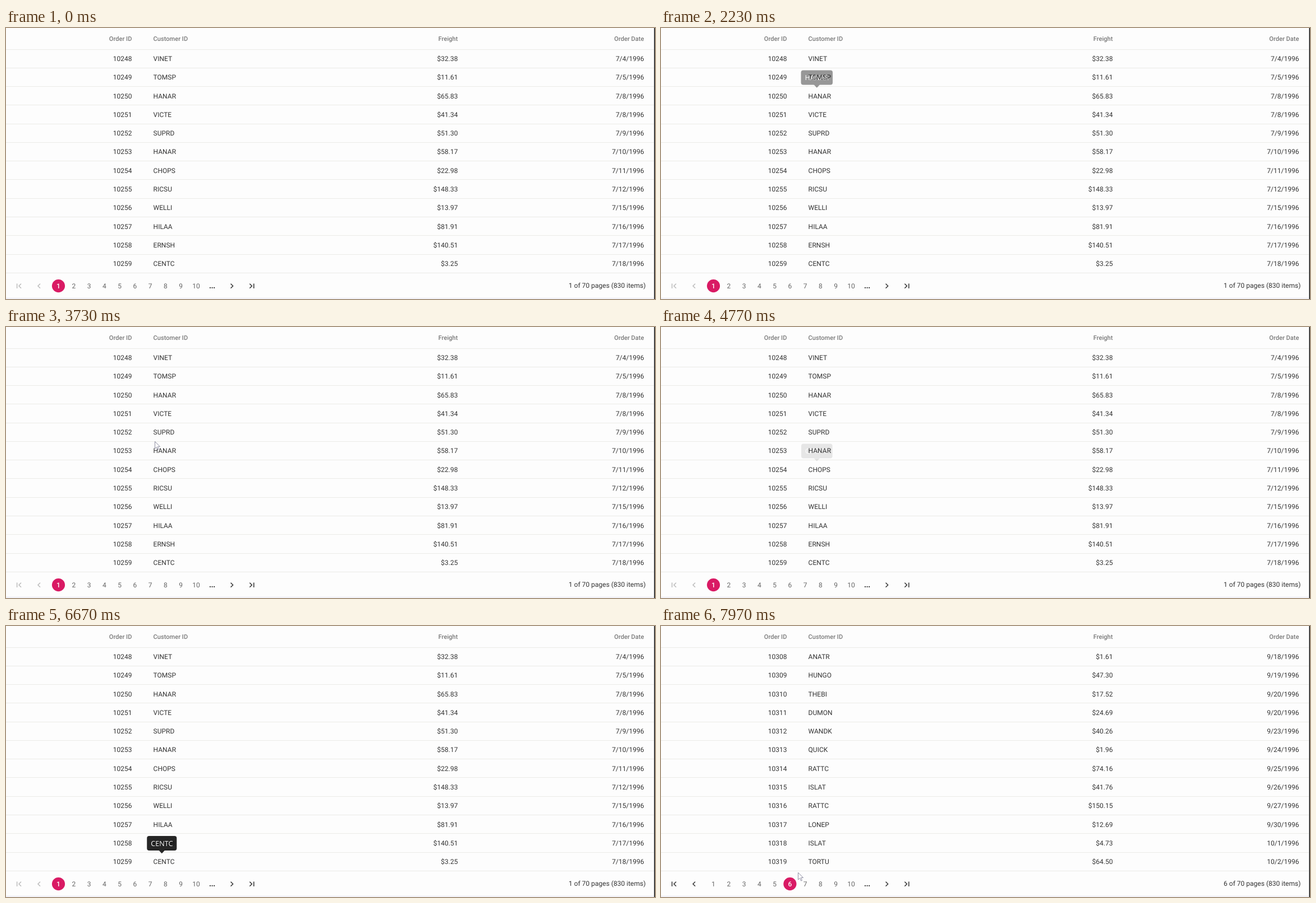
An HTML page that plays this animation: 1157x484 px, repeating every 8 s.

```html
<!DOCTYPE html>
<html lang="en">
<head>
<meta charset="utf-8">
<title>Orders grid</title>
<style>
  html, body { margin: 0; width: 100%; height: 100%; overflow: hidden; background: #fdfdfd; }
  svg { display: block; width: 1157px; height: 484px; }
  text { font: 12.03px Roboto, sans-serif; fill: #333; text-rendering: geometricPrecision; }
  .end { text-anchor: end; }
  .mid { text-anchor: middle; }
  .head text { font-size: 11.1px; font-weight: 500; fill: #7a7a7a; }
  .rule { stroke: #ebebe7; }
  .num { fill: #666; }
  .num.on { fill: #fff; font-weight: 500; }
  .icon { fill: none; stroke: #333; stroke-width: 1.5; }
  .icon.off { stroke: #bbb; }
  .tip text { font: 12.6px "Open Sans", sans-serif; fill: #fff; }
  .tip rect, .tip path { fill: #131313; }
</style>
</head>
<body>
<svg viewBox="0 0 1157 484">
  <rect width="1157" height="484" fill="#fdfdfd"/>
  <g id="rules"></g>
  <path d="M0 482.5H1155" stroke="#e6e6f4"/>
  <rect x="1155.5" width="1.5" height="484" fill="#111"/>
  <g id="head" class="head"></g>
  <g id="rows"></g>
  <circle id="dot" cy="460.6" r="11.6" fill="#d91a64"/>
  <g id="pager"></g>
  <path class="icon back" d="M19.6 456.5v8.4M27 456.7l-4 4 4 4"/>
  <path class="icon back" d="M61 456.7l-4 4 4 4"/>
  <path class="icon" d="M400.6 456.7l4 4-4 4"/>
  <path class="icon" d="M434.4 456.7l4 4-4 4M441.8 456.5v8.4"/>
  <path d="M364 463.9h8" stroke="#333" stroke-width="2.2" stroke-linecap="round" stroke-dasharray="0 3.6"/>
  <text id="info" class="end" x="1140.4" y="463.5" fill="#444"></text>
  <g id="tips"></g>
  <path id="cursor" d="M.5 .5V13.2L3.5 10.4L5.6 15.2L7.5 14.4L5.5 9.7H9.6Z" fill="#fdfdfd" stroke="#85859a" stroke-width=".9"/>
</svg>
<script>
const LOOP = 8000, TOP = 38, ROW = 33.28, COUNT = 12;
const PAGE_TURN = 7450, TIP_LAG = 200, TIP_FADE = 8;
const $ = id => document.getElementById(id);
const clamp = v => Math.max(0, Math.min(1, v));
const rows = Array.from({ length: COUNT }, (_, i) => i);
const centre = i => TOP + ROW * (i + .5);
const buttonX = n => 93.5 + 27.28 * (n - 1);

function add(parent, tag, attrs, text = '') {
  const el = document.createElementNS('http://www.w3.org/2000/svg', tag);
  for (const key in attrs) el.setAttribute(key, attrs[key]);
  el.textContent = text;
  $(parent)?.append(el) ?? parent.append?.(el);
  return el;
}

const columns = [
  { title: 'Order ID', x: 224.5, class: 'end' },
  { title: 'Customer ID', x: 262.6, class: '' },
  { title: 'Freight', x: 805.4, class: 'end' },
  { title: 'Order Date', x: 1137.5, class: 'end' }
];

const pages = {
  1: {
    first: 10248, start: '1996-07-04',
    orders: `VINET $32.38,TOMSP $11.61,HANAR $65.83,VICTE $41.34,SUPRD $51.30,HANAR $58.17,
      CHOPS $22.98,RICSU $148.33,WELLI $13.97,HILAA $81.91,ERNSH $140.51,CENTC $3.25`
  },
  6: {
    first: 10308, start: '1996-09-18',
    orders: `ANATR $1.61,HUNGO $47.30,THEBI $17.52,DUMON $24.69,WANDK $40.26,QUICK $1.96,
      RATTC $74.16,ISLAT $41.76,RATTC $150.15,LONEP $12.69,ISLAT $4.73,TORTU $64.50`
  }
};

// One order per weekday, except that the fourth shares the third's date
function weekdays(start) {
  const day = new Date(start + 'T12:00:00Z');
  return rows.map(i => {
    if (i && i !== 3) {
      do day.setUTCDate(day.getUTCDate() + 1); while (day.getUTCDay() % 6 === 0);
    }
    return `${day.getUTCMonth() + 1}/${day.getUTCDate()}/${day.getUTCFullYear()}`;
  });
}

for (const page of Object.values(pages)) {
  const dates = weekdays(page.start);
  page.rows = page.orders.split(',').map((order, i) =>
    [page.first + i, ...order.trim().split(' '), dates[i]]);
}

for (let i = 0; i <= COUNT; i++) {
  add('rules', 'path', { class: 'rule', d: `M0 ${Math.round(TOP + ROW * i - .5) + .5}H1155` });
}
for (const { title, ...place } of columns) add('head', 'text', { ...place, y: 22.6 }, title);

const cells = rows.map(i => columns.map(({ x, class: cls }) =>
  add('rows', 'text', { x, y: centre(i) + 4.4, class: cls })));

const buttons = Array.from({ length: 10 }, (_, i) =>
  add('pager', 'text', { x: buttonX(i + 1), y: 465 }, i + 1));

const tips = rows.map(i => {
  const tip = add('tips', 'g', { class: 'tip', transform: `translate(277.8 ${centre(i) - 45.7})` });
  tip.id = 'tip' + i;
  const box = add(tip.id, 'rect', { height: 26, rx: 4 });
  add(tip.id, 'path', { d: 'M-5.5 25.6H5.5L0 31.2Z' });
  const label = add(tip.id, 'text', { class: 'mid', y: 17.6 }, pages[1].rows[i][1]);
  const width = label.getComputedTextLength() + 14;
  box.setAttribute('x', -width / 2);
  box.setAttribute('width', width);
  return tip;
});

let shown = 0;
function showPage(n) {
  if (n === shown) return;
  shown = n;
  cells.forEach((row, i) => row.forEach((cell, k) => cell.textContent = pages[n].rows[i][k]));
  buttons.forEach((b, i) => b.setAttribute('class', 'mid num' + (i + 1 === n ? ' on' : '')));
  document.querySelectorAll('.back').forEach(el => el.classList.toggle('off', n === 1));
  $('dot').setAttribute('cx', buttonX(n));
  $('info').textContent = `${n} of 70 pages (830 items)`;
}

// Pointer stops: down the column, to the pager button, away
const stops = [
  { t: 1030, x: 272, y: 37.8 }, { t: 3400, x: 265, y: 204 }, { t: 3850, x: 265, y: 204 },
  { t: 5770, x: 279, y: 379 }, { t: 6700, x: 276, y: 422 }, { t: 7250, x: 231, y: 459 },
  { t: 7600, x: 231, y: 459 }, { t: LOOP, x: 245, y: 438.4 }
];

function pointer(t) {
  const k = stops.findIndex(s => s.t > t);
  if (k < 1) return null;
  const a = stops[k - 1], b = stops[k], f = (t - a.t) / (b.t - a.t);
  return { x: a.x + (b.x - a.x) * f, y: a.y + (b.y - a.y) * f };
}

// A tooltip fades as the delayed pointer crosses the edges of its row
function tipAlpha(i, at) {
  if (!at) return 0;
  const depth = at.y - TOP - ROW * i;
  return Math.min(clamp(depth / TIP_FADE), clamp((ROW - .5 - depth) / TIP_FADE));
}

function moveCursor(at) {
  // The arrow vanishes while the pointer is over a line of cell text
  const overText = at && at.y < TOP + ROW * COUNT && Math.abs((at.y - TOP) % ROW - ROW / 2) < 7.8;
  $('cursor').setAttribute('visibility', at && !overText ? 'visible' : 'hidden');
  if (at) $('cursor').setAttribute('transform', `translate(${at.x} ${at.y})`);
}

function render(t) {
  showPage(t < PAGE_TURN ? 1 : 6);
  const delayed = pointer(t - TIP_LAG);
  tips.forEach((tip, i) => tip.setAttribute('opacity', tipAlpha(i, delayed)));
  moveCursor(pointer(t));
}

const begin = performance.now();
function tick() {
  render((performance.now() - begin) % LOOP);
  requestAnimationFrame(tick);
}
tick();
</script>
</body>
</html>
```
